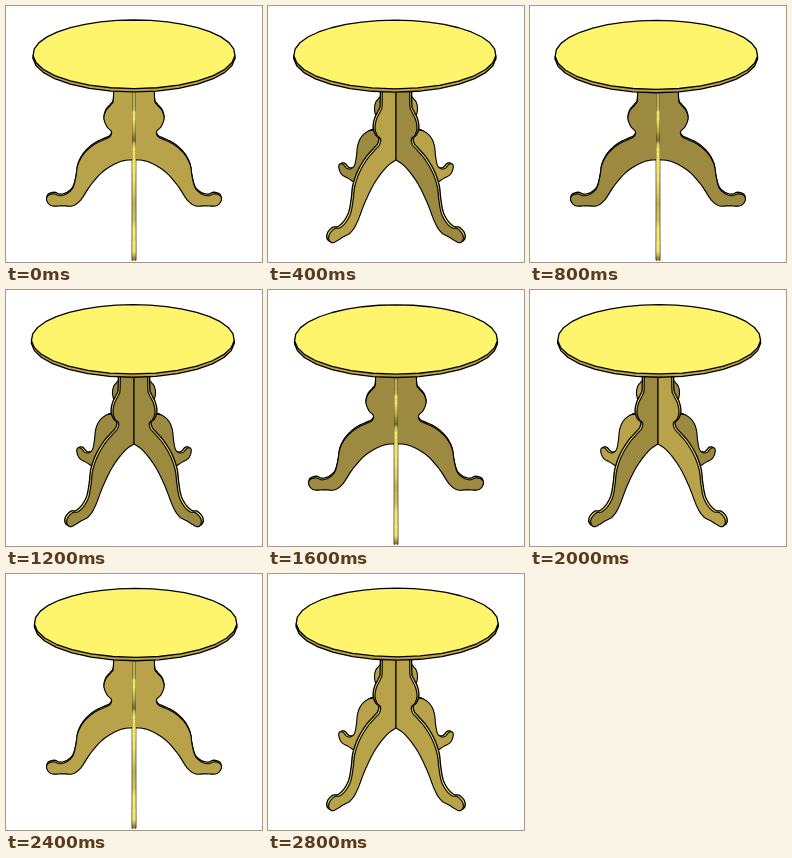
An HTML page with a canvas that plays this animation: 256 px wide and 256 px high, repeating every 3200 ms.

```html
<!DOCTYPE html>
<html lang="en">
<head>
<meta charset="utf-8">
<title>Turning table</title>
<style>
  html, body { margin: 0; width: 100%; height: 100%; overflow: hidden; background: #fff; }
  canvas { display: block; width: 100%; height: 100%; }
</style>
</head>
<body>
<canvas id="stage" width="256" height="256"></canvas>
<script>
const ctx = document.getElementById('stage').getContext('2d');
const STEP_MS = 400, STEPS = 8;
const DIST = 640, HORIZON = -172, MID = 128;
const THICK = 2.8;
const TOP = { y: 43.5, radius: 100, depth: 2.8, sides: 32, offset: 1.6 };
const LIGHT = '#b9a34a', DARK = '#9c8a41', INK = '#000';

// Leg outline as [radius, height on screen at the axis]
const knots = [
  [20.5, 60], [20.5, 92], [23, 98], [28, 104], [30, 112], [27, 120], [22.5, 125],
  [24, 130], [30, 133], [40, 138], [50, 147], [56, 158], [58, 170], [61, 181],
  [67, 187], [74, 189], [80, 187], [86, 189], [87, 194], [82, 199], [70, 199],
  [61, 199], [53, 193], [43, 178], [30, 164], [14, 155], [1.4, 153]
];

function smooth(pts, steps) {
  const out = [];
  for (let i = 0; i < pts.length - 1; i++) {
    const a = pts[Math.max(0, i - 1)], b = pts[i], c = pts[i + 1];
    const d = pts[Math.min(pts.length - 1, i + 2)];
    for (let j = 0; j < steps; j++) {
      const t = j / steps;
      out.push([0, 1].map(k => b[k] + 0.5 * t * (c[k] - a[k]
        + t * (2 * a[k] - 5 * b[k] + 4 * c[k] - d[k]
        + t * (3 * (b[k] - c[k]) + d[k] - a[k])))));
    }
  }
  out.push(pts[pts.length - 1]);
  return out;
}
const profile = smooth(knots, 5);

function project(x, y, z) {
  const s = DIST / (DIST - z);
  return [MID + x * s, HORIZON + (y - HORIZON) * s];
}

function shape(pts, fill, stroke, width = 1.3) {
  ctx.beginPath();
  pts.forEach(p => ctx.lineTo(p[0], p[1]));
  ctx.closePath();
  if (fill) { ctx.fillStyle = fill; ctx.fill(); }
  if (stroke) { ctx.strokeStyle = stroke; ctx.lineWidth = width; ctx.stroke(); }
}

function edgeColor(up) {
  const t = Math.max(0, Math.min(1, 0.55 + 0.7 * up));
  const mix = (a, b) => Math.round(a + (b - a) * t);
  return `rgb(${mix(120, 246)},${mix(104, 232)},${mix(45, 112)})`;
}

function makeLeg(index, angle) {
  const sin = Math.sin(angle), cos = Math.cos(angle);
  const place = ([r, y], side) => {
    const off = side * THICK / 2;
    return project(r * sin + off * cos, y, r * cos - off * sin);
  };
  const face = side => [[THICK / 2, 60], ...profile].map(p => place(p, side));
  return { index, sin, cos, place, face, edgeOn: Math.abs(sin) < 0.01 };
}

function drawEdges({ sin, cos, place }) {
  for (let i = 0; i < profile.length - 1; i++) {
    const a = profile[i], b = profile[i + 1];
    const dr = b[0] - a[0], dy = b[1] - a[1];
    const facing = dy * (DIST * cos - a[0]) - dr * (HORIZON - a[1]);
    if (facing <= 0) continue;
    const color = edgeColor(dr / Math.hypot(dr, dy));
    shape([place(a, 1), place(b, 1), place(b, -1), place(a, -1)], color, color, 0.4);
  }
}

function drawLeg(leg) {
  if (leg.edgeOn) return drawEdges(leg);
  const near = leg.sin < 0 ? 1 : -1;
  const normal = (leg.index + near + 4) % 4;
  const far = leg.face(-near);
  shape(far, DARK);
  drawEdges(leg);
  shape(far, null, INK);
  shape(leg.face(near), normal < 2 ? LIGHT : DARK, INK, 1.1);
}

function drawTop(turn) {
  const cx = -TOP.offset * Math.sin(turn), cz = -TOP.offset * Math.cos(turn);
  const ring = y => Array.from({ length: TOP.sides }, (_, i) => {
    const a = turn + i / TOP.sides * Math.PI * 2;
    return project(cx + TOP.radius * Math.sin(a), y, cz + TOP.radius * Math.cos(a));
  });
  const upper = ring(TOP.y), lower = ring(TOP.y + TOP.depth);
  shape(lower, '#b8a24a', INK);
  // Dark ends where the rim turns away
  for (const pick of [Math.min, Math.max]) {
    const x = pick(...upper.map(p => p[0]));
    const i = upper.findIndex(p => p[0] === x);
    shape([upper[i], lower[i]], null, INK);
  }
  shape(upper, '#fff56c', INK);
}

function draw(step) {
  const turn = step * Math.PI / 4;
  ctx.fillStyle = '#fff';
  ctx.fillRect(0, 0, 256, 256);
  ctx.lineJoin = 'round';
  const legs = [0, 1, 2, 3]
    .map(i => makeLeg(i, turn + i * Math.PI / 2))
    .sort((a, b) => a.cos - b.cos);
  // Sides of an edge-on leg only show against the background
  legs.filter(leg => leg.edgeOn).forEach(leg =>
    [1, -1].forEach(side => shape(leg.face(side), null, INK, 1.5)));
  legs.forEach(drawLeg);
  drawTop(turn);
}

const start = performance.now();
function tick() {
  draw(Math.floor((performance.now() - start) / STEP_MS) % STEPS);
  requestAnimationFrame(tick);
}
tick();
</script>
</body>
</html>
```
